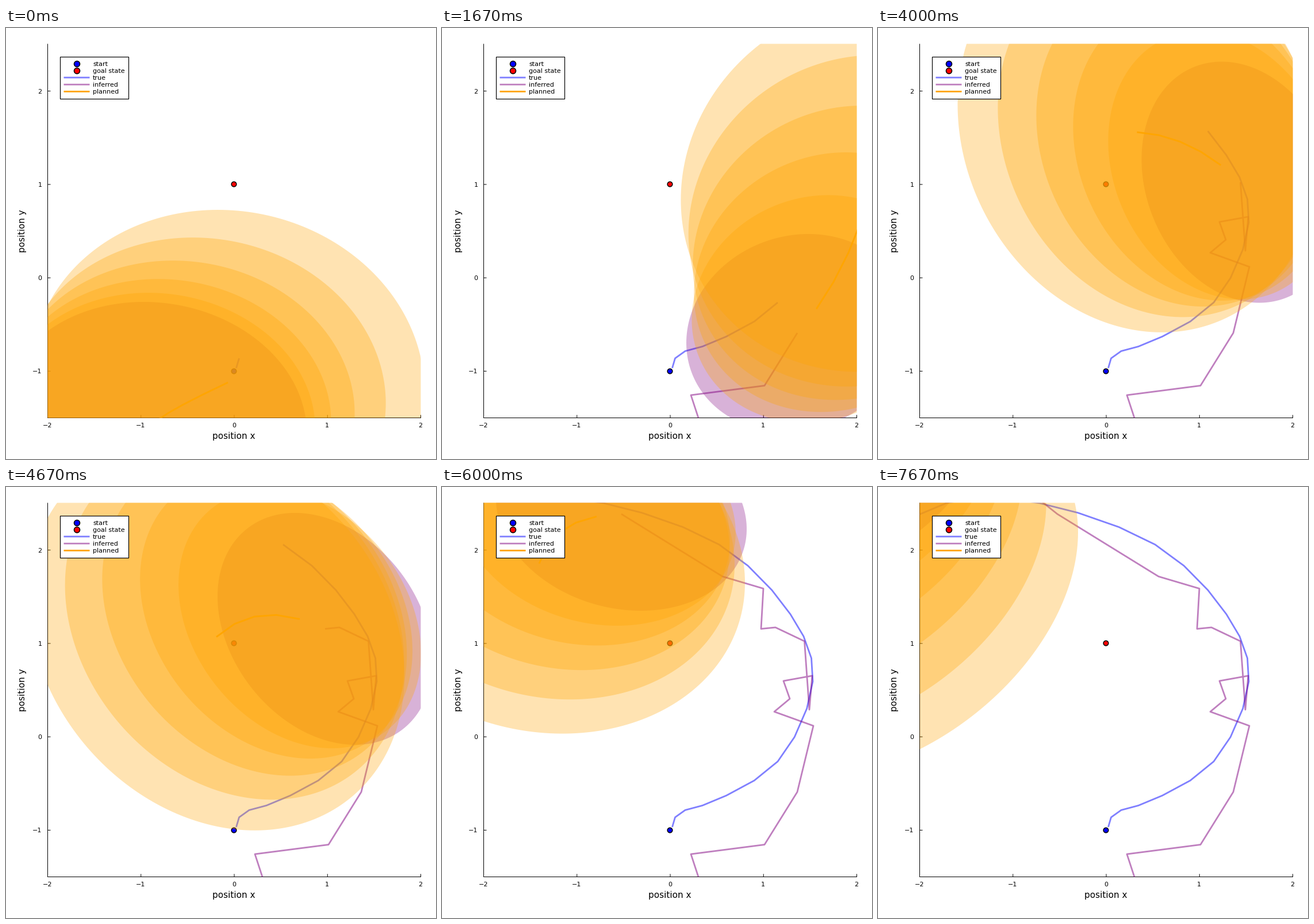
Write a matplotlib script that moves like this. It is 748x749 px and loops after 8 s.

```python
import numpy as np
import matplotlib.pyplot as plt
from matplotlib.animation import FuncAnimation
from matplotlib.patches import Polygon, Rectangle

WIDTH, HEIGHT, DPI = 748, 749, 100
FRAMES, LOOP_MS, HORIZON = 24, 8000, 5
LEFT, RIGHT, TOP, BOTTOM = 72.5, 721.5, 27.5, 677.5
START, GOAL, UNIT = (396.5, 596), (396.5, 271.3), 162.25
PX = 72 / DPI  # points per pixel

# Key points as (step, x, y) in stage pixels.
TRUE_KEYS = np.array([
    (0, 400.5, 591), (2, 423, 561.5), (3, 453, 553.5), (6, 584, 477),
    (9, 645, 338), (12, 606, 221), (15, 482, 100), (18, 281, 28),
    (21, 119, 28), (24, -20, 120)])
# The estimate is noisy, so its corners are given and joined by straight lines.
ESTIMATE_KEYS = np.array([
    (0, 258, 688), (2, 455, 705), (3, 433, 638), (4, 561, 621.5), (5, 618, 530),
    (6, 646, 415), (7, 578, 390.5), (8, 605, 368), (9, 594, 337), (10, 644, 328),
    (11, 639, 387), (12, 630.5, 268), (13, 580, 244), (14, 555, 246.5),
    (15, 559, 176.5), (16, 488, 155.5), (18, 312, 47), (19, 190, -50),
    (23, -10, -48)])
# step, reach of the plan (x, y), half width, half height, correlation
BELIEF_KEYS = np.array([
    (0, 128, -72, 265, 212, -.07), (5, 130, -255, 193, 172, .10),
    (9, -97, -79, 172, 202, -.09), (12, -180, -87, 172, 209.5, -.19),
    (14, -189, 14, 187, 201.5, -.28), (18, -143, 86, 218, 168, -.155),
    (23, 5, 238, 213, 199, .48)])


def linear(keys, step):
    return np.array([np.interp(step, keys[:, 0], col) for col in keys[:, 1:].T])


def smooth(keys, step):
    """Cubic Hermite curve through the key points."""
    steps, points = keys[:, 0], keys[:, 1:]
    slopes = np.gradient(points, steps, axis=0, edge_order=2)
    i = min(np.searchsorted(steps, step, side="right") - 1, len(steps) - 2)
    span = steps[i + 1] - steps[i]
    u = (step - steps[i]) / span
    ease = u * u * (3 - 2 * u)
    return (points[i] * (1 - ease) + points[i + 1] * ease
            + span * u * (1 - u) * ((1 - u) * slopes[i] - u * slopes[i + 1]))


TRUE_PATH = np.array([smooth(TRUE_KEYS, k) for k in range(FRAMES + 1)])
ESTIMATE = np.array([linear(ESTIMATE_KEYS, k) for k in range(FRAMES)])

plt.rcParams["font.family"] = "DejaVu Sans"
fig = plt.figure(figsize=(WIDTH / DPI, HEIGHT / DPI), dpi=DPI, facecolor="white")
ax = fig.add_axes([0, 0, 1, 1])
ax.set(xlim=(0, WIDTH), ylim=(HEIGHT, 0))
ax.axis("off")
# A polygon keeps the clip edge antialiased, halfway across the axis lines.
clip = Polygon([(LEFT, TOP), (RIGHT, TOP), (RIGHT, BOTTOM), (LEFT, BOTTOM)],
               transform=ax.transData)


def stroke(xs, ys, color, width, z, alpha=1):
    return ax.plot(xs, ys, color=color, lw=width * PX, alpha=alpha, zorder=z,
                   solid_capstyle="butt", solid_joinstyle="round", snap=False)[0]


def dot(center, color, size, z):
    ax.plot(*center, "o", ms=size * PX, mfc=color, mec="black", mew=1.5 * PX,
            zorder=z, snap=False)


def label(x, y, text, px=11.1, ha="left", angle=0):
    ax.text(x, y, text, fontsize=px * PX, ha=ha, va="baseline", zorder=9,
            rotation=angle, rotation_mode="anchor")


def blob(color, z):
    patch = ax.add_patch(Polygon(np.zeros((3, 2)), fc=color, ec="none",
                                 alpha=.3, zorder=z))
    patch.set_clip_path(clip)
    return patch


def ellipse(center, w, h, corr):
    a = np.linspace(0, 2 * np.pi, 241)
    rise = corr * np.cos(a) + np.sqrt(1 - corr ** 2) * np.sin(a)
    return np.column_stack((center[0] + w * np.cos(a), center[1] - h * rise))


def draw_axes():
    stroke((LEFT, LEFT), (TOP, BOTTOM + .5), "black", 1, 1)
    stroke((LEFT - .5, RIGHT + .5), (BOTTOM, BOTTOM), "black", 1, 1)
    for value in range(-2, 3):
        text = str(value).replace("-", "\u2212")
        x = LEFT + (value + 2) * UNIT
        stroke((x, x), (BOTTOM, BOTTOM - 5), "black", 1, 1)
        label(x - .5, 694, text, ha="center")
        if value > -2:
            y = BOTTOM - (value + 1.5) * UNIT
            stroke((LEFT, LEFT + 5), (y, y), "black", 1, 1)
            label(62.5, y + 4, text, ha="right")
    label(396.6, 714, "position x", 15.28, "center")
    label(33, 353, "position y", 15.28, "center", angle=90)


def draw_legend():
    ax.add_patch(Rectangle((94, 49.5), 119, 73, fc="white", ec="black",
                           lw=1.2 * PX, zorder=8))
    rows = (("start", "blue", 1), ("goal state", "red", 1), ("true", "blue", .5),
            ("inferred", "purple", .5), ("planned", "orange", 1))
    for i, (text, color, alpha) in enumerate(rows):
        y = 61.8 + 12.15 * i
        if i < 2:
            dot((123, y), color, 10, 9)
        else:
            stroke((100.5, 145.5), (y, y), color, 2.8, 9, alpha)
        label(151, y + 4, text)


draw_axes()
draw_legend()
dot(START, "blue", 8.6, 2)
dot(GOAL, "red", 8.6, 2)

true_line = stroke([], [], "blue", 2.8, 3, .5)
inferred_line = stroke([], [], "purple", 2.8, 3.5, .5)
planned_line = stroke([], [], "orange", 2.8, 6)
for line in (true_line, inferred_line, planned_line):
    line.set_clip_path(clip)
now_blob = blob("purple", 4)
plan_blobs = [blob("orange", 5) for _ in range(HORIZON)]


def update(step):
    here = ESTIMATE[step]
    *reach, w, h, corr = linear(BELIEF_KEYS, step)
    reach = np.array(reach)
    unsure = np.exp(-step)

    # The plan accelerates evenly from its first move to its full reach.
    velocity = TRUE_PATH[step + 1] - TRUE_PATH[step]
    first = (velocity + reach / HORIZON) / 2 * (1 - .5 * unsure)
    accel = (reach - HORIZON * first) / (HORIZON * (HORIZON - 1))
    j = np.arange(1, HORIZON + 1)[:, None]
    plan = here + (first - accel) * j + accel * j ** 2

    true_line.set_data(*TRUE_PATH[:step + 2].T)
    inferred_line.set_data(*ESTIMATE[:step + 1].T)
    planned_line.set_data(*plan.T)
    now_blob.set_xy(ellipse(here, w, h, corr))

    # Uncertainty widens and straightens along the plan.
    growth = np.array((140, 160 - 1.8 * step)) * (1 - .45 * unsure)
    bend = .18 + .5 * unsure
    for i, patch in enumerate(plan_blobs):
        t = (i + 1) / HORIZON
        dw, dh = growth * t * (1 - bend + bend * t)
        patch.set_xy(ellipse(plan[i], w + dw, h + dh, corr * (1 - .27 * t)))
    return [true_line, inferred_line, planned_line, now_blob, *plan_blobs]


anim = FuncAnimation(fig, update, frames=FRAMES, interval=LOOP_MS / FRAMES,
                     init_func=lambda: update(0), repeat=True, repeat_delay=0)
plt.show()
```
